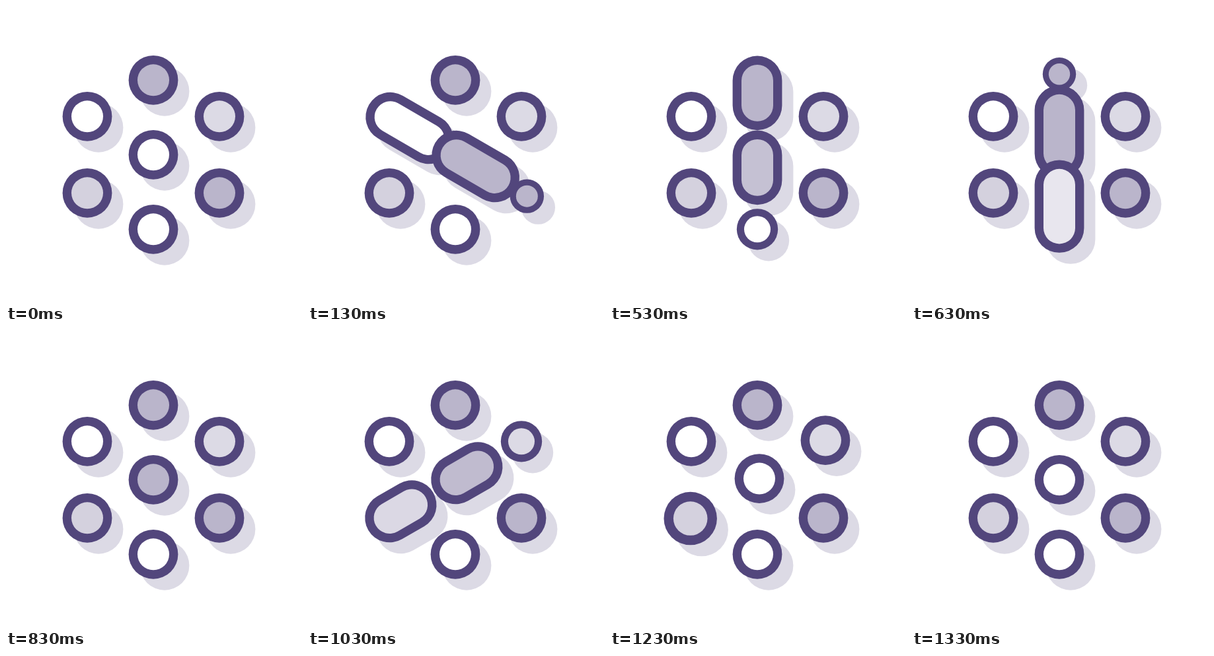
Animation of 448x450 px, one loop 1.36 s. Source, as an HTML page with a canvas:

```html
<!DOCTYPE html>
<html lang="en">
<head>
<meta charset="utf-8">
<title>Sliding rings</title>
<style>
  html, body { margin: 0; width: 100%; height: 100%; overflow: hidden; background: #fff; }
  canvas { display: block; width: 448px; height: 450px; }
</style>
</head>
<body>
<canvas id="stage" width="448" height="450"></canvas>
<script>
const ctx = document.getElementById("stage").getContext("2d");
const LOOP = 1360;
const OUTER = 37.4, INNER = 24, DROP = 17;
const INK = [82, 70, 124];

// A move travels for six steps, then settles for four.
const TRAVEL = 6, SETTLE = 4;
const OVERSHOOT = 1.04, STRETCH = 0.335;

// Tint is the share of ink mixed into white.
const ball = (x, y, tint) => ({ x, y, tint });
const center = { x: 223, y: 225.3 };
const upper = ball(223, 112.3, 0.4);
const lower = ball(223, 338.3, 0);
const topLeft = ball(123, 167.3, 0);
const topRight = ball(323, 167.3, 0.2);
const bottomLeft = ball(123, 283.3, 0.25);
const bottomRight = ball(323, 283.3, 0.4);
const outerBalls = [upper, lower, topLeft, topRight, bottomLeft, bottomRight];

// Each move shifts a row of three one place along, from `from` to `to`.
// `drift` is the new ball's outward offset at the start and end of travel,
// `swell` its size when travel ends.
const moves = [
  { from: bottomRight, to: topLeft, before: 0, after: 0.4, drift: [5, 12], swell: 1.03 },
  { from: upper, to: lower, before: 0.4, after: 0.4, drift: [18, 4.6], swell: 1.01, leaderOnTop: true },
  { from: bottomLeft, to: topRight, before: 0.4, after: 0, drift: [27, 2], swell: 1.1 }
];

const clamp = v => Math.max(0, Math.min(1, v));
const mix = (a, b, k) => a + (b - a) * k;
const between = (a, b, k) => ({ x: mix(a.x, b.x, k), y: mix(a.y, b.y, k) });
const shade = tint => `rgb(${INK.map(c => Math.round(mix(255, c, tint))).join()})`;

// Goes from start to peak while travelling, then on to rest while settling.
const keyed = (start, peak, rest, go, calm) => mix(mix(start, peak, go), rest, calm);

function line(a, b, radius, color, shift = 0) {
  ctx.strokeStyle = color;
  ctx.lineWidth = radius * 2;
  ctx.beginPath();
  ctx.moveTo(a.x + shift, a.y + shift);
  ctx.lineTo(b.x + shift + 0.01, b.y + shift);
  ctx.stroke();
}

function drawAll(pills) {
  const visible = pills.filter(p => p.size > 0);
  for (const p of visible) line(p.a, p.b, OUTER * p.size, shade(0.2), DROP);
  for (const p of visible) {
    line(p.a, p.b, OUTER * p.size, shade(1));
    line(p.a, p.b, INNER * p.size, shade(p.tint));
  }
}

const pill = (a, b, tint, size = 1) => ({ a, b, tint, size });

function slide(start, end, tintA, tintB, go, calm) {
  const middle = keyed(0, OVERSHOOT, 1, go, calm);
  const half = STRETCH * Math.sin(Math.PI * go);
  return pill(between(start, end, middle - half), between(start, end, middle + half),
    mix(tintA, tintB, go));
}

function newcomer({ from, drift, swell }, go, calm) {
  const length = Math.hypot(from.x - center.x, from.y - center.y);
  const offset = keyed(drift[0], drift[1], 0, go, calm);
  const spot = between(center, from, 1 + offset / length);
  return pill(spot, spot, from.tint, keyed(0, swell, 1, go, calm));
}

function render(time) {
  // Thirty steps per second, held on a 10 ms grid.
  const step = Math.floor((3 * Math.floor(time / 10) + 1) / 10);
  const index = Math.min(2, Math.floor(step / 15));
  const move = moves[index];
  const local = step - index * 15;
  const go = clamp(local / TRAVEL);
  const calm = clamp((local - TRAVEL) / SETTLE);
  const { from, to } = move;

  const still = outerBalls
    .filter(b => b !== from && b !== to)
    .map(b => pill(b, b, b.tint));
  const leaving = pill(to, to, to.tint, 1 - go);
  const leader = slide(center, to, move.before, to.tint, go, calm);
  const follower = slide(from, center, from.tint, move.after, go, calm);
  const pair = move.leaderOnTop ? [follower, leader] : [leader, follower];

  ctx.fillStyle = "#fff";
  ctx.fillRect(0, 0, 448, 450);
  ctx.lineCap = "round";
  drawAll([...still, leaving, newcomer(move, go, calm), ...pair]);
}

const began = performance.now();
function tick() {
  render((performance.now() - began) % LOOP);
  requestAnimationFrame(tick);
}
tick();
</script>
</body>
</html>
```
